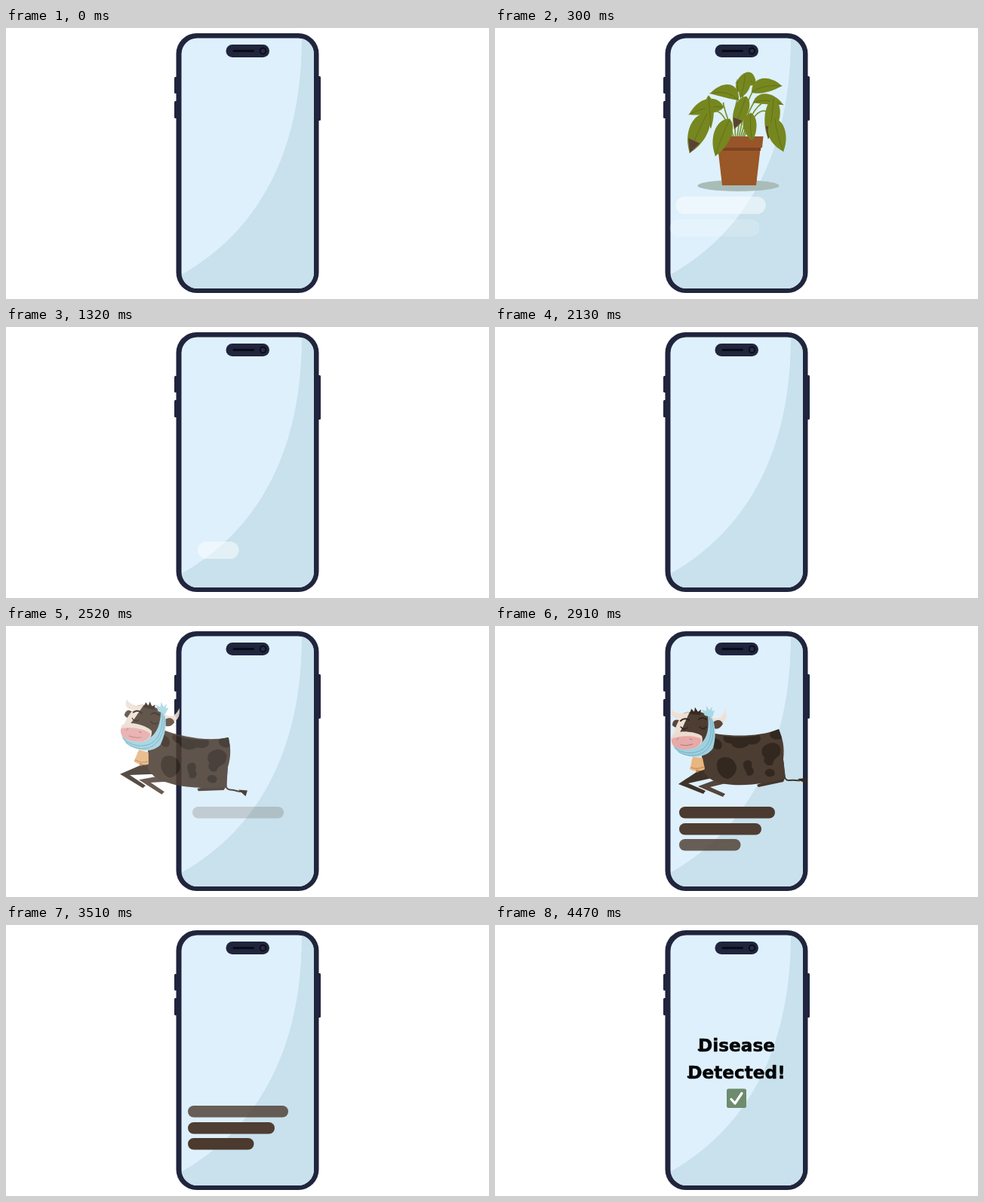
An HTML page that plays this animation: 640 px wide and 360 px high, repeating every 4500 ms.

```html
<!DOCTYPE html>
<html lang="en">
<head>
<meta charset="utf-8">
<title>Disease detection</title>
<style>
html, body { margin: 0; width: 100%; height: 100%; overflow: hidden; background: #fff; }
svg { display: block; width: 100vw; height: 100vh; }
text { font: bold 23.2px "DejaVu Sans", sans-serif; text-anchor: middle; fill: #050608; stroke: #050608; stroke-width: .5; stroke-linejoin: round; }
.line { fill: none; stroke-linecap: round; stroke-linejoin: round; }
</style>
</head>
<body>
<svg viewBox="0 0 640 360">
  <defs><clipPath id="screen"><rect x="232.5" y="13.5" width="175.5" height="332.5" rx="21"/></clipPath></defs>

  <g id="phone" fill="#20253d">
    <rect x="223" y="65" width="6" height="22" rx="1.5"/>
    <rect x="223" y="97" width="6" height="23" rx="1.5"/>
    <rect x="411" y="64" width="6" height="59" rx="1.5"/>
    <rect x="225.5" y="7" width="189" height="345" rx="27"/>
    <g clip-path="url(#screen)">
      <rect x="232" y="13" width="177" height="334" fill="#def0fb"/>
      <path d="M392 13C392 160 338 268 232 328V347H409V13Z" fill="#c8e1ec"/>
    </g>
    <rect x="291.5" y="22" width="57.5" height="17" rx="8.5"/>
    <path class="line" d="M302 30.5H327.5" stroke="#090b16" stroke-width="3"/>
    <circle cx="340.5" cy="30.5" r="3.8" fill="#262c46" stroke="#090b16" stroke-width="1.8"/>
  </g>

  <g id="plant">
    <ellipse cx="322.5" cy="201.5" rx="54" ry="7.5" fill="#a9bcb8"/>
    <g id="leaves"></g>
    <path d="M295 149H352L346 201H301Z" fill="#9a5728"/>
    <path d="M295.500 150H352.500L352 155H296Z" fill="#7d4320"/>
    <path d="M292 136H355.500L354 151H294.500Z" fill="#98552a"/>
    <g id="frontLeaves"></g>
  </g>

  <g id="whiteBars" fill="#fff"></g>
  <g id="darkBars"></g>

  <g id="cow">
    <path class="line" d="M380 172C384 190 380 206 390 205S398 206 405 205" stroke="#43352c" stroke-width="2"/>
    <path d="M401 203L413 202 412 210Z" fill="#33281f"/>
    <path d="M385 200L382 207 349 214 347 211 366 204Z" fill="#44362d"/>
    <path d="M279 186L243 210 276 223 279 219 256 209 292 201Z" fill="#3f3229"/>
    <path d="M304 200L269 213 302 227 305 223 285 214 314 207Z" fill="#55453a"/>
    <path d="M276 139C296 146 345 150 376 137C381 149 384 160 382 177L385 202C365 208 332 214 306 210C282 207 273 195 274 174Z" fill="#4c3d33"/>
    <g fill="#33281f">
      <path d="M303 146C318 149 335 148 350 145C356 153 346 159 337 157C328 166 314 162 313 156C305 156 301 151 303 146Z"/>
      <path d="M288 148C298 149 304 157 299 163C291 167 289 158 283 157Z"/>
      <path d="M365 141L376 137 380 149C372 154 361 148 365 141Z"/>
      <path d="M359 158C368 151 381 157 378 167C378 175 370 173 368 184C362 188 354 182 357 175C351 168 353 161 359 158Z"/>
      <path d="M295 179C301 171 315 174 318 182C324 190 316 202 308 203C299 202 291 190 295 179Z"/>
      <path d="M329 182C335 174 343 180 340 187C347 195 340 201 334 198C333 191 328 189 329 182Z"/>
      <path d="M360 191C367 187 374 194 369 199C361 203 354 196 360 191Z"/>
    </g>
    <path d="M262 174C260 180 260 185 258 190C263 193 273 194 278 190L275 175Z" fill="#e8b680"/>
    <path class="line" d="M260 188Q268 191 277 187" stroke="#cf945f" stroke-width="1.500"/>
    <circle cx="268" cy="192.500" r="2" fill="#c88c57"/>
    <path d="M246 123C235 124 232 117 235 111C238 116 244 116 250 117Z" fill="#f0e0d4"/>
    <path d="M287 121C298 126 303 119 305 110C309 122 305 132 291 131Z" fill="#f0e0d4"/>
    <path d="M247 127C240 122 235 125 235 132C240 137 245 135 248 132Z" fill="#5a463b"/>
    <path d="M289 128C295 123 300 125 302 130C298 137 293 138 289 135Z" fill="#5a463b"/>
    <path d="M278 115C293 118 294 145 289 162C280 177 253 178 238 163L234 153 266 140Z" fill="#9fd0df"/>
    <path d="M250 116C260 112 279 113 282 120C284 136 281 151 271 157L241 149C242 137 244 126 250 116Z" fill="#4d3d33"/>
    <path d="M250 116L258 114 249 134 241 148 236 147C238 136 243 124 250 116Z" fill="#eedfd3"/>
    <path d="M234 146C239 138 265 139 274 146C278 157 268 163 254 164C237 164 231 156 234 146Z" fill="#ecdccf"/>
    <path d="M234 150C245 145 265 145 273 150C274 159 266 163 254 164C238 164 233 158 234 150Z" fill="#e6aaa8"/>
    <g class="line" stroke="#30261f" stroke-width="1.300">
      <path d="M246 134Q250 139 255 135"/>
      <path d="M271 134Q276 139 280 134"/>
      <path d="M246 126Q251 121 257 125M270 124Q275 120 280 124" stroke-width="2"/>
      <path d="M241 151L243 149M258 150L261 151M246 158Q254 160 262 157" stroke="#b67778" stroke-width="1"/>
    </g>
    <g class="line" stroke="#70afc4" stroke-width="1">
      <path d="M284 121C289 139 286 156 275 164C263 171 248 170 239 162"/>
      <path d="M287 124C292 143 288 160 276 168C266 174 251 173 243 167"/>
    </g>
    <path d="M258 117L260 110 264 114 265 108 269 114 273 111 272 118Z" fill="#352920"/>
    <path d="M278 119L274 111 280 113 280 106 284 112 288 107 287 113 291 112 288 121Z" fill="#a8d7e4"/>
  </g>

  <g id="message">
    <g class="part"><text x="320" y="168">Disease</text><path class="line" d="M274 165.500Q271 167.500 269.800 165.500" stroke="#050608" stroke-width="2.500"/></g>
    <g class="part"><text x="320" y="204">Detected!</text><path class="line" d="M260 201.500Q257 203.500 255.800 201.500" stroke="#050608" stroke-width="2.500"/></g>
    <g class="part">
      <rect x="307" y="217.500" width="26" height="25.500" rx="2.500" fill="#6e8b6e"/>
      <path class="line" d="M313 231.500L318 237 327 223.500" stroke="#fff" stroke-width="3.200"/>
    </g>
  </g>
</svg>
<script>
const LOOP = 4500;
const $ = id => document.getElementById(id);
const clamp = v => Math.max(0, Math.min(1, v));
const progress = (t, start, length) => clamp((t - start) / length);
const easeOut = p => 1 - (1 - p) ** 3;

function add(parent, tag, attrs) {
  const el = document.createElementNS('http://www.w3.org/2000/svg', tag);
  for (const k in attrs) el.setAttribute(k, attrs[k]);
  return parent.appendChild(el);
}

// A leaf runs from base to tip; bend pushes its middle sideways.
function leaf(parent, x, y, tx, ty, width, bend, brown) {
  const dx = tx - x, dy = ty - y, len = Math.hypot(dx, dy);
  const at = (u, side) =>
    `${(x + dx * u - dy / len * side).toFixed(1)} ${(y + dy * u + dx / len * side).toFixed(1)}`;
  const w = width * .66;
  add(parent, 'path', {
    d: `M${x} ${y}C${at(.1, bend + w)} ${at(.65, bend + w)} ${tx} ${ty}` +
       `C${at(.65, bend - w)} ${at(.1, bend - w)} ${x} ${y}Z`,
    fill: '#76871f'
  });
  add(parent, 'path', {
    class: 'line', d: `M${x} ${y}Q${at(.45, bend)} ${tx} ${ty}`,
    stroke: '#5c6d17', 'stroke-width': .8
  });
  if (brown) add(parent, 'path', {
    d: `M${at(.7, bend * .6 + w * .5)}L${tx} ${ty}L${at(.7, bend * .6 - w * .5)}Z`, fill: '#5b4038'
  });
}

const stems = [[281, 108, 300, 88], [303, 92, 300, 88], [322, 86, 316, 95], [330, 72, 326, 98],
  [342, 76, 333, 88], [344, 90, 336, 100], [366, 90, 346, 84], [372, 114, 350, 82]];
stems.forEach(([x, y, cx, cy], i) => add($('leaves'), 'path', {
  class: 'line', d: `M${x} ${y}Q${cx} ${cy} ${314 + i * 2.300} 137`, stroke: '#78942f', 'stroke-width': 1.700
}));

[
  [303, 97, 257, 107, 20, 7], [283, 82, 286, 125, 11, 0],
  [323, 88, 285, 79, 18, 11], [322, 77, 321, 61, 5, 0],
  [346, 67, 319, 65, 18, 9], [331, 54, 325, 85, 15, -3],
  [340, 77, 380, 69, 19, -7], [342, 91, 382, 94, 14, -8],
  [281, 106, 258, 158, 25, 2, 1], [369, 86, 362, 139, 20, -2, 1],
  [371, 113, 382, 156, 23, 3]
].forEach(a => leaf($('leaves'), ...a));
[
  [311, 113, 292, 162, 23, 2], [333, 83, 317, 126, 19, 0, 1], [339, 105, 341, 142, 18, 3]
].forEach(a => leaf($('frontLeaves'), ...a));

const whiteBars = [[224, 119], [254, 119], [285, 54.500]].map(([y, width]) =>
  add($('whiteBars'), 'rect', { x: 242, y, width, height: 23, rx: 11.500 }));
const darkWidths = [133, 115, 87.500];
const darkBars = [[240, '#4a3a2f'], [262, '#4e3e34'], [283, '#4b3a2d']].map(([y, fill]) =>
  add($('darkBars'), 'rect', { y, height: 15.500, rx: 7.750, fill }));
const parts = document.querySelectorAll('.part');

function place(el, opacity, transform) {
  el.setAttribute('opacity', opacity);
  if (transform) el.setAttribute('transform', transform);
}

function drawPlant(t) {
  const rise = 90 * (1 - easeOut(progress(t, 0, 540)));
  const leave = progress(t, 950, 150);
  place($('plant'), progress(t, 0, 300) * (1 - leave), `translate(0 ${rise - 90 * leave ** 2})`);
  whiteBars.forEach((bar, i) => {
    const enter = progress(t, 150 + 100 * i, 300);
    const exit = progress(t, 1020 + 100 * i, 200);
    place(bar, enter * (1 - exit), `translate(${24 * exit - 18 * (1 - easeOut(enter))} 0)`);
  });
}

function drawCow(t) {
  const shift = -226 * (1 - easeOut(progress(t, 2370, 540))) + 260 * progress(t, 3240, 260) ** 3;
  const opacity = progress(t, 2350, 195) * (1 - progress(t, 3410, 95));
  place($('cow'), opacity, `translate(${shift} 0) rotate(${-shift * .118} 315 165)`);

  const inset = 6 - 3 * progress(t, 2520, 390) - 3 * progress(t, 2910, 600);
  darkBars.forEach((bar, i) => {
    bar.setAttribute('x', 241 + inset);
    bar.setAttribute('width', darkWidths[i] - 2 * inset);
    place(bar, progress(t, 2460 + 105 * i, 300) * (1 - progress(t, 3450 + 100 * i, 300)));
  });
}

function draw(t) {
  drawPlant(t);
  drawCow(t);
  parts.forEach((part, i) => place(part, progress(t, 3600 + 80 * i, 200)));
}

let begin;
function tick(now) {
  begin ??= now;
  draw((now - begin) % LOOP);
  requestAnimationFrame(tick);
}
draw(0);
requestAnimationFrame(tick);
</script>
</body>
</html>
```
